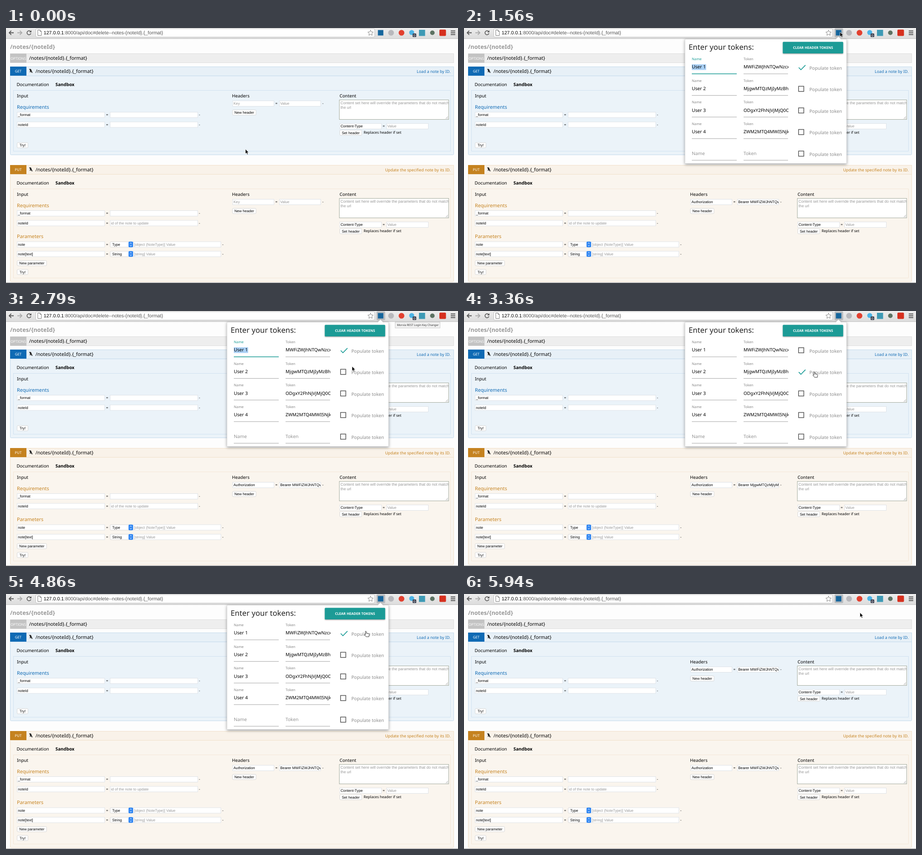
Recreate the animation shown at these times as an HTML page. Size 996x562 px, loop 5.97 s.

```html
<!DOCTYPE html>
<html lang="en">
<head>
<meta charset="utf-8">
<title>API token switcher</title>
<style>
  html, body { margin: 0; width: 100%; height: 100%; overflow: hidden; background: #fdfdfd; }
  #stage { display: block; width: 996px; height: 562px; }
  text { font-family: "Noto Sans", "Open Sans", sans-serif; white-space: pre; text-rendering: geometricPrecision; }
  .ui { font-family: "Liberation Sans", Arial, sans-serif; }
  .bold { font-weight: 700; }
</style>
</head>
<body>
<svg id="stage" viewBox="0 0 996 562" xmlns="http://www.w3.org/2000/svg"></svg>
<script>
const LOOP = 5970;
const OPEN_AT = 1290, CLOSE_AT = 5700;
const PICK_SECOND = 3240, PICK_FIRST = 4140;
const TIP_FROM = 1980, TIP_TO = 3060;
const HOVER_FROM = 1040;
const TEAL = '#1a9b96', HINT = '#969696';
const GET = { color: '#0f6ab4', head: '#e7f0f7', body: '#ebf3f9', line: '#c3d9ec' };
const PUT = { color: '#c5821f', head: '#f9f2e9', body: '#faf5ee', line: '#f0e0ca' };
const ROW_STEP = 47.6;
const tokens = ['MWFiZWJhNTQwNzcx', 'MjgwMTQzMjIyMzBhZ', 'ODgxY2FhNjVjMjQ0OD', 'ZWM2MTQ4MWI5NjkzY'];

const rect = (x, y, w, h, fill, extra = '') =>
  `<rect x="${x}" y="${y}" width="${w}" height="${h}" fill="${fill}" ${extra}/>`;
const path = (d, stroke, width = 1, extra = '') =>
  `<path d="${d}" fill="none" stroke="${stroke}" stroke-width="${width}" ${extra}/>`;
const dot = (x, y, r, fill) => `<circle cx="${x}" cy="${y}" r="${r}" fill="${fill}"/>`;
const text = (x, y, size, value, fill = '#000', extra = '') =>
  `<text x="${x}" y="${y}" font-size="${size}" fill="${fill}" ${extra}>${value}</text>`;
const uiText = (x, y, size, value, fill = '#000') => text(x, y, size, value, fill, 'class="ui"');

// A nested svg clips long values at the edge of the field.
function field(x, mid, w, value = '', fill = '#000', id = '') {
  return rect(x + .5, mid - 5.5, w - 1, 12, '#fff', 'stroke="#d9dee4" stroke-width=".8"') +
    `<svg x="${x + 1}" y="${mid - 6}" width="${w - 2}" height="13">` +
    text(1.2, 9.2, 8.15, value, fill, `class="ui" ${id && `id="${id}"`}`) + '</svg>';
}

function button(x, mid, w, label) {
  return rect(x + .5, mid - 5.5, w - 1, 11.5, '#fff', 'rx="2" stroke="#d0d0d0" stroke-width=".8"') +
    text(x + w / 2, mid + 3.2, 8.1, label, '#000', 'class="ui" text-anchor="middle"');
}

const equals = (x, mid) => text(x, mid + 3, 8.2, '=');
const minus = (x, mid) => text(x, mid + 3, 8.2, '-');

function requirement(mid, name, hint = '') {
  return field(24, mid, 194, name) + equals(220.5, mid) + field(229, mid, 194, hint, HINT) + minus(425, mid);
}

function parameter(mid, name, type, hint) {
  return field(24, mid, 194, name) + equals(220.5, mid) +
    field(280, mid, 194, hint, HINT) + minus(476.5, mid) +
    rect(229.5, mid - 5.5, 50, 12, '#fff', 'rx="2" stroke="#d0d0d0" stroke-width=".8"') +
    uiText(234, mid + 3.3, 8.1, type) +
    rect(270, mid - 5.7, 10, 12.4, '#2f86f3', 'rx="2"') +
    path(`M273 ${mid - 1}l2-2.2 2 2.2M273 ${mid + 2}l2 2.2 2-2.2`, '#fff');
}

function section(top, height, method, note, theme, body) {
  const y = n => top + n;
  const { color, head, line } = theme;
  const id = method.toLowerCase();
  const border = `stroke="${line}" stroke-width="1"`;
  return rect(9.5, y(.5), 977, height, theme.body, `rx="2" ${border}`) +
    rect(9.5, y(.5), 977, 20, head, border) +
    rect(9, y(0), 36, 20, color) +
    text(27, y(13.4), 7.8, method, '#fff', 'text-anchor="middle"') +
    `<path d="M51 ${y(5)}l4 .6 3.6 8.4-2.2-.4-1.6-3-.8 2.2-1.6-.6.6-3z" fill="#222"/>` +
    text(65, y(13.6), 10.73, '/notes/{noteId}.{_format}') +
    text(979.5, y(13.6), 8.8, note, color, 'text-anchor="end"') +
    text(23.5, y(43.4), 9.75, 'Documentation') +
    text(109, y(43.4), 9.8, 'Sandbox', '#000', 'class="bold"') +
    rect(16.5, y(52.5), 963, height - 60, 'none', `${border} stroke-dasharray="2 1"`) +
    text(24, y(68.2), 9.8, 'Input') +
    text(498, y(68.2), 9.8, 'Headers') +
    text(735, y(68.2), 9.8, 'Content') +
    text(24, y(93), 10.75, 'Requirements', color) +
    field(499, y(81), 92, 'Key', HINT, id + 'Key') + equals(593.5, y(81)) +
    field(602, y(81), 92, 'Value', HINT, id + 'Value') + minus(697, y(81)) +
    button(498.5, y(101), 53, 'New header') +
    rect(734.5, y(73.5), 241, 43, '#fff', 'stroke="#a4ab9d"') +
    uiText(737, y(83.2), 8.55, 'Content set here will override the parameters that do not match', HINT) +
    uiText(737, y(92.6), 8.55, 'the url', HINT) +
    path(`M969 ${y(115)}l5-5m-2 5l2-2`, '#888', .8) +
    field(735, y(131), 93, 'Content-Type') + equals(830, y(131)) + field(838, y(131), 93, 'Value', HINT) +
    button(735, y(145.5), 49.5, 'Set header') +
    text(788, y(148.4), 8.1, 'Replaces header if set') +
    body;
}

function toolbar() {
  return rect(0, 0, 996, 23, 'url(#bar)') + path('M0 23.5H996', '#c4c4c4') +
    path('M17 10.5H7m4.6-4.6L7 10.5l4.6 4.6', '#555', 1.8) +
    path('M25 10.5h10m-4.6-4.6l4.6 4.6-4.6 4.6', '#aaa', 1.8) +
    path('M54.4 8.2a4.4 4.4 0 1 0 .5 3.5', '#555', 1.6) + '<path d="M56 5v4.6h-4.6z" fill="#555"/>' +
    rect(65.5, 1.5, 747, 18.5, '#fff', 'rx="2.5" stroke="#c2c2c2"') +
    path('M70 4.5h5l3 3v9h-8zM75 4.5v3h3', '#777') +
    uiText(83, 14.3, 10.66, '127.0.0.1<tspan fill="#555">:8000/api/doc#delete--notes-{noteId}.{_format}</tspan>') +
    path('M803.3 4.6l1.8 4 4.2.5-3.1 2.9.8 4.2-3.7-2.1-3.7 2.1.8-4.2-3.1-2.9 4.2-.5z', '#777', .9) +
    rect(816.5, .8, 19, 19.4, '#b9bcbf', 'id="hover" rx="2.5"') +
    rect(819.5, 4.5, 12, 12, '#15659c') +
    dot(848.5, 10.5, 6.3, '#b8b8bc') + dot(871.5, 10.5, 6.3, '#e2402f') + dot(894, 10, 5.5, '#4db4e6') +
    rect(896, 12, 8, 8, '#3c4050', 'rx="1.5"') + uiText(898, 18.6, 7, '0', '#fff') +
    rect(910, 4, 13.5, 13.5, '#3e9ab5') + dot(939.5, 10.5, 5, '#5c7262') +
    rect(955, 3.5, 14.5, 14, '#d6301f', 'rx="2"') +
    path('M980 6.5h10m-10 4h10m-10 4h10', '#555', 1.8);
}

function tokenRow(i) {
  const y = n => n + i * ROW_STEP;
  const saved = i < tokens.length;
  const values = saved
    ? text(502, y(71.2), 7.7, 'Name', '#858585', i ? '' : 'id="focusLabel"') +
      text(616, y(71.2), 7.7, 'Token', '#858585') +
      (i ? '' : rect(502, 80, 31.5, 12.5, '#a9d0f5', 'id="selection"')) +
      text(502, y(89.4), 10.2, 'User ' + (i + 1)) +
      `<svg x="616" y="${y(77)}" width="99" height="18">${text(0, 12.4, 10, tokens[i])}</svg>`
    : text(502, y(89.6), 10.2, 'Name', '#929292') + text(616, y(89.6), 10.2, 'Token', '#929292');
  return values +
    path(`M502 ${y(101)}H601`, '#9a9a9a', .9, i ? '' : 'id="focusLine"') +
    path(`M616 ${y(101)}H714`, '#9a9a9a', .9) +
    rect(737.3, y(80.8), 11.4, 11.4, 'none', `id="box${i}" stroke="#555" stroke-width="1.5"`) +
    path(`M737.6 ${y(87)}l4.8 5 10-10.2`, TEAL, 1.7, `id="check${i}"`) +
    text(761, y(91.6), 10.1, 'Populate token', '#8b8b8b');
}

function popup() {
  return '<g id="popup"><path d="M487 24.5H819.5L825 18.8l5.5 5.7H843V298.5H487z" fill="#fff" stroke="#c4c4c4" stroke-width=".6" filter="url(#shadow)"/>' +
    text(495, 47.8, 16.7, 'Enter your tokens:', '#222') +
    rect(702.5, 30.5, 133, 25.5, TEAL, 'rx="1.5" filter="url(#lift)"') +
    text(769, 46.2, 7.65, 'CLEAR HEADER TOKENS', '#fff', 'class="bold" text-anchor="middle"') +
    [0, 1, 2, 3, 4].map(tokenRow).join('') + '</g>';
}

const stage = document.getElementById('stage');
stage.innerHTML = `<defs>
  <linearGradient id="bar" x2="0" y2="1"><stop stop-color="#ededed"/><stop offset="1" stop-color="#dcdcdc"/></linearGradient>
  <filter id="shadow" x="-10%" y="-10%" width="120%" height="120%"><feDropShadow dx="0" dy="2" stdDeviation="3" flood-opacity=".38"/></filter>
  <filter id="lift" x="-10%" y="-20%" width="120%" height="160%"><feDropShadow dx="0" dy="1.2" stdDeviation="1.1" flood-opacity=".4"/></filter>
</defs>` +
  rect(0, 0, 996, 562, '#fdfdfd') + toolbar() +
  text(9, 46, 12.8, '/notes/{noteId}', '#999', 'class="bold"') +
  rect(9.5, 56.5, 977, 20, '#eee', 'stroke="#dedede"') + rect(9, 56.5, 36, 20, '#c3c3c3') +
  text(27, 70, 7.75, 'OPTIONS', '#fff', 'text-anchor="middle"') +
  text(51, 70.2, 10.73, '/notes/{noteId}.{_format}') +
  section(85, 194, 'GET', 'Load a note by ID.', GET,
    requirement(191, '_format') + requirement(212.5, 'noteId') + button(24, 258, 25, 'Try!')) +
  section(302, 256.5, 'PUT', 'Update the specified note by its ID.', PUT,
    requirement(408, '_format') + requirement(429.5, 'noteId', 'id of the note to update') +
    text(24, 463, 10.75, 'Parameters', PUT.color) +
    parameter(476.5, 'note', 'Type', '[object (NoteType)] Value') +
    parameter(497.5, 'note[text]', 'String', '[string] Value') +
    button(24, 518, 66, 'New parameter') + button(24, 537.5, 25, 'Try!')) +
  path('M0 561.5H996', '#8c8c8c') + popup() +
  '<g id="tip">' + rect(857.5, 24.5, 99, 13, '#f1f1f1', 'stroke="#c6c6c6" stroke-width=".8"') +
  text(861.5, 33.4, 6.2, 'Morvia REST Login Key Changer', '#333') + '</g>' +
  '<path id="arrow" d="M-.4 0v10.2l2.3-2.1 1.7 3.8 1.7-.8-1.7-3.6h3.2z" fill="#000" stroke="#fff" stroke-width=".7"/>' +
  '<path id="hand" d="M-1.2 1c0-1.4 2-1.4 2.1 0l.5 3.6 5 .9c1 .3 1.2 1 1 2l-.8 4.7H.6L-3 7.8c-.8-1 .4-1.9 1.4-1.1l.9.7z" fill="#fff" stroke="#222" stroke-width=".9"/>';

const el = id => document.getElementById(id);
const show = (id, on) => el(id).setAttribute('display', on ? 'inline' : 'none');

// time, x, y of the pointer's hot spot
const route = [
  [0, 528, 267], [390, 528, 267], [1080, 829, 9], [2220, 829, 9], [2790, 763, 122],
  [3090, 772, 134], [3360, 772, 134], [3840, 775, 87], [4290, 775, 87],
  [4770, 793, 82], [4950, 793, 82], [5580, 873, 41], [LOOP, 873, 41]
];

function pointerAt(t) {
  const next = Math.max(1, route.findIndex(p => p[0] > t));
  const [t0, x0, y0] = route[next - 1], [t1, x1, y1] = route[next];
  const k = (t - t0) / (t1 - t0), e = k * k * (3 - 2 * k);
  return [x0 + (x1 - x0) * e, y0 + (y1 - y0) * e];
}

function setHeader(prefix, key, value, fill) {
  for (const [part, content] of [['Key', key], ['Value', value]]) {
    const node = el(prefix + part);
    node.textContent = content;
    node.setAttribute('fill', fill);
  }
}

function draw(t) {
  const isOpen = t >= OPEN_AT && t < CLOSE_AT;
  const chosen = t >= PICK_SECOND && t < PICK_FIRST ? 1 : 0;
  const focused = t < PICK_SECOND;

  show('hover', t >= HOVER_FROM);
  show('popup', isOpen);
  show('tip', t >= TIP_FROM && t < TIP_TO);
  show('selection', focused);
  el('focusLabel').setAttribute('fill', focused ? TEAL : '#858585');
  el('focusLine').setAttribute('stroke', focused ? TEAL : '#9a9a9a');
  el('focusLine').setAttribute('stroke-width', focused ? 1.5 : .9);
  for (let i = 0; i < 5; i++) {
    show('box' + i, i !== chosen);
    show('check' + i, i === chosen);
  }
  for (const prefix of ['get', 'put']) {
    if (t < OPEN_AT) setHeader(prefix, 'Key', 'Value', HINT);
    else setHeader(prefix, 'Authorization', 'Bearer ' + tokens[chosen], '#000');
  }

  const [x, y] = pointerAt(t);
  const row = (y - 79) / ROW_STEP;
  const onLabel = isOpen && x > 736 && x < 835 && row > 0 && row % 1 < .4;
  show('arrow', !onLabel);
  show('hand', onLabel);
  for (const id of ['arrow', 'hand']) el(id).setAttribute('transform', `translate(${x} ${y})`);
}

const start = performance.now();
function tick() {
  draw((performance.now() - start) % LOOP);
  requestAnimationFrame(tick);
}
tick();
</script>
</body>
</html>
```
